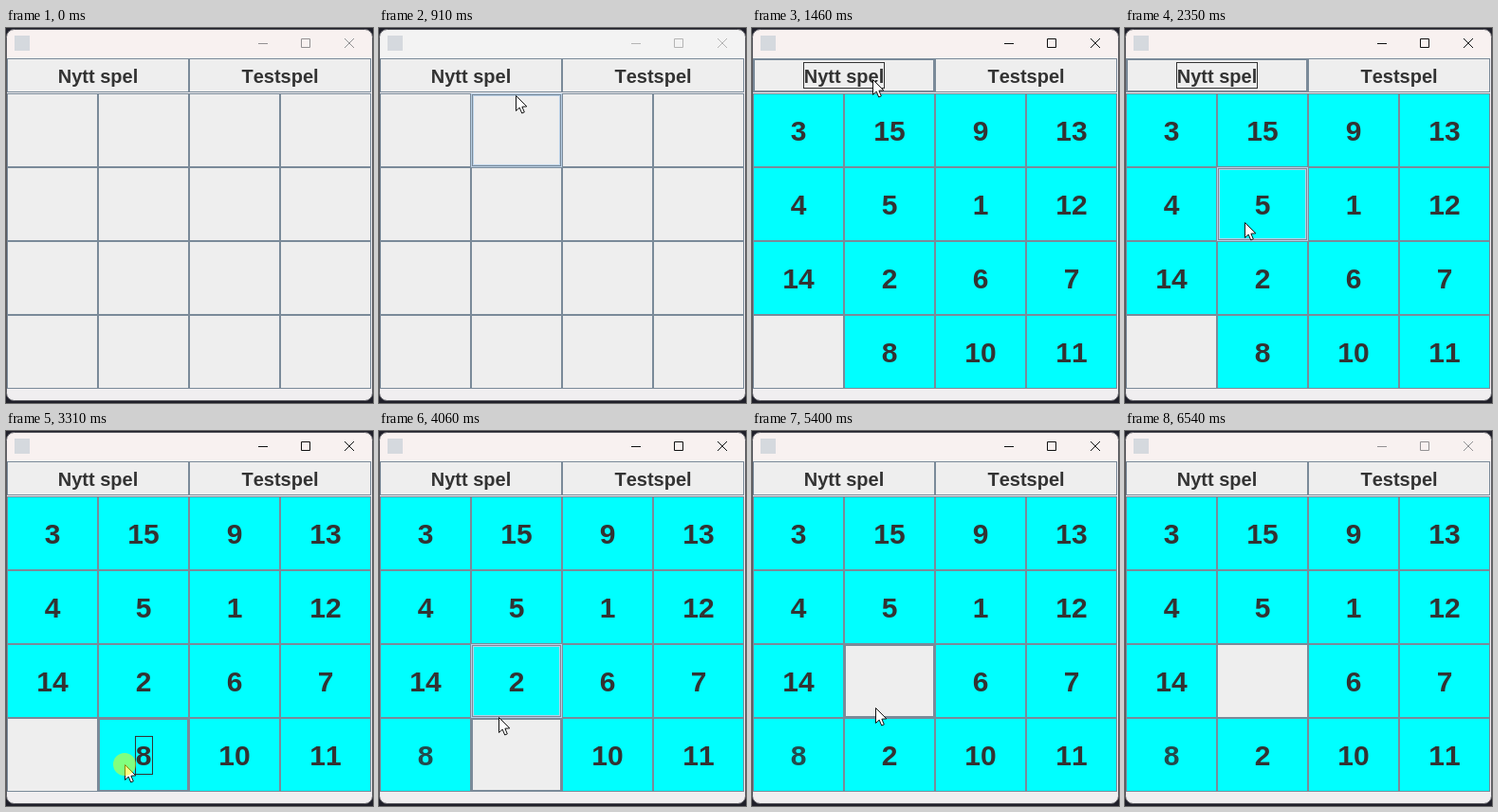
Animation of 387x396 px, one loop 6610 ms. Source, as an HTML page with a canvas:

```html
<!DOCTYPE html>
<html lang="sv">
<head>
<meta charset="utf-8">
<title>Nytt spel</title>
<style>
html, body { margin: 0; width: 387px; height: 396px; overflow: hidden; background: #20202a; }
canvas { display: block; }
</style>
</head>
<body>
<canvas id="stage" width="387" height="396"></canvas>
<script>
const ctx = document.getElementById('stage').getContext('2d');
const LOOP = 6610, STEP = 70;
const LINE = '#7a8a99', GLOW = '#b8cfe5', GREY = '#eeeeee', INK = '#333333';

// Moments when the state changes
const ENTER = 70, NEW_GAME = 1390, FILL = 1460, PRESS_8 = 3310, MOVE_8 = 3380,
      PRESS_2 = 4400, MOVE_2 = 4470, LEAVE = 5680, BLUR = 6540;

const BOARD = '3 15 9 13 4 5 1 12 14 2 6 7 0 8 10 11'.split(' ').map(Number);

// Eased pointer moves between resting points
const MOVES = [
  { from: ENTER, to: 700, x: 155, y: 82 },
  { from: 700, to: 1190, x: 127, y: 54 },
  { from: 1800, to: 2770, x: 125, y: 352 },
  { from: 3780, to: 4200, x: 127, y: 284 },
  { from: 5330, to: 5400, x: 130, y: 292 },
  { from: 5400, to: LEAVE, x: 300, y: 400 }
];

const smooth = k => k * k * (3 - 2 * k);

function pointerAt(t) {
  if (t < ENTER || t >= LEAVE) return null;
  let x = 250, y = 385;
  for (const m of MOVES) {
    if (t < m.from) break;
    const elapsed = Math.floor((t - m.from) / STEP) * STEP;
    const k = smooth(Math.min(1, elapsed / (m.to - m.from)));
    x += (m.x - x) * k;
    y += (m.y - y) * k;
  }
  return { x: Math.round(x), y: Math.round(y) };
}

function boardAt(t) {
  if (t < FILL) return Array(16).fill(0);
  const b = [...BOARD];
  if (t >= MOVE_8) [b[12], b[13]] = [b[13], b[12]];
  if (t >= MOVE_2) [b[13], b[9]] = [b[9], b[13]];
  return b;
}

function focusAt(t) {
  if (t < NEW_GAME || t >= BLUR) return null;
  return t < PRESS_8 ? 'new' : t < PRESS_2 ? 13 : 9;
}

function outline(x, y, w, h, inset, color) {
  ctx.strokeStyle = color;
  ctx.lineWidth = 1;
  ctx.strokeRect(x + inset + .5, y + inset + .5, w - 2 * inset - 1, h - 2 * inset - 1);
}

function button(x, y, w, h, fill, focused, hovered) {
  ctx.fillStyle = fill;
  ctx.fillRect(x, y, w, h);
  const rings = focused ? [LINE, LINE] : hovered ? [GLOW, LINE, GLOW] : [LINE];
  rings.forEach((color, inset) => outline(x, y, w, h, inset, color));
}

function label(text, x, y, size, color = INK) {
  ctx.font = `bold ${size}px "Liberation Sans", Arial, sans-serif`;
  ctx.fontKerning = 'none';
  ctx.textAlign = 'center';
  ctx.fillStyle = color;
  ctx.fillText(text, x, y);
}

function drawWindow(t) {
  const active = t >= NEW_GAME && t < BLUR;
  const entering = t >= ENTER && t < NEW_GAME;
  ctx.fillStyle = '#20202a';
  ctx.fillRect(0, 0, 387, 396);
  ctx.save();
  ctx.beginPath();
  ctx.roundRect(.5, 1.5, 386, 392, 8);
  ctx.clip();
  ctx.fillStyle = '#f0eef0';
  ctx.fillRect(0, 0, 387, 396);
  ctx.fillStyle = entering ? '#f3f3f3' : '#f8f1f0';
  ctx.fillRect(0, 0, 387, 32);
  ctx.restore();
  ctx.strokeStyle = '#5c5c62';
  ctx.lineWidth = 1;
  ctx.stroke();

  ctx.fillStyle = '#d5d9de';
  ctx.fillRect(9, 8, 16, 16);

  ctx.strokeStyle = active ? '#111111' : entering ? '#b4b4b4' : '#929092';
  ctx.beginPath();
  ctx.moveTo(266, 16.5); ctx.lineTo(276, 16.5);
  ctx.rect(311.5, 11.5, 9, 9);
  ctx.moveTo(357, 11); ctx.lineTo(367, 21);
  ctx.moveTo(367, 11); ctx.lineTo(357, 21);
  ctx.stroke();
}

function drawPointer({ x, y }) {
  ctx.save();
  ctx.translate(x + .5, y + .5);
  ctx.beginPath();
  [[0, 0], [0, 16], [3.7, 12.6], [6.2, 18.5], [8.8, 17.4], [6.4, 11.7], [11.3, 11.4]]
    .forEach(p => ctx.lineTo(...p));
  ctx.closePath();
  ctx.fillStyle = '#ffffff';
  ctx.fill();
  ctx.strokeStyle = '#111111';
  ctx.lineWidth = 1;
  ctx.stroke();
  ctx.restore();
}

function draw(t) {
  const mouse = pointerAt(t), board = boardAt(t), focus = focusAt(t);
  const over = (x, y, w, h) => mouse && mouse.x >= x && mouse.x < x + w && mouse.y >= y && mouse.y < y + h;

  drawWindow(t);

  ['Nytt spel', 'Testspel'].forEach((text, i) => {
    const x = 1 + 192 * i, focused = i === 0 && focus === 'new';
    button(x, 32, 192, 36, GREY, focused, over(x, 32, 192, 36));
    if (focused) outline(54, 36, 86, 28, 0, INK);
    label(text, x + 96, 58, 20);
  });

  board.forEach((n, i) => {
    const x = 1 + 96 * (i % 4), y = 69 + 78 * Math.floor(i / 4);
    const enabled = n || t < FILL;
    button(x, y, 96, 78, n ? '#00ffff' : GREY, focus === i, enabled && over(x, y, 96, 78));
    if (!n) return;
    if (focus === i) outline(x + 39, y + 19, 19, 41, 0, INK);
    label(n, x + 48, y + 50, 30, i === 12 ? '#244a4c' : INK);
  });

  if (!mouse) return;
  drawPointer(mouse);
  if ([NEW_GAME, PRESS_8, PRESS_2].some(c => t >= c && t < c + STEP)) {
    ctx.fillStyle = 'rgba(255, 255, 0, .5)';
    ctx.beginPath();
    ctx.arc(mouse.x, mouse.y, 12, 0, 2 * Math.PI);
    ctx.fill();
  }
}

function tick() {
  draw(performance.now() % LOOP);
  requestAnimationFrame(tick);
}
tick();
</script>
</body>
</html>
```
